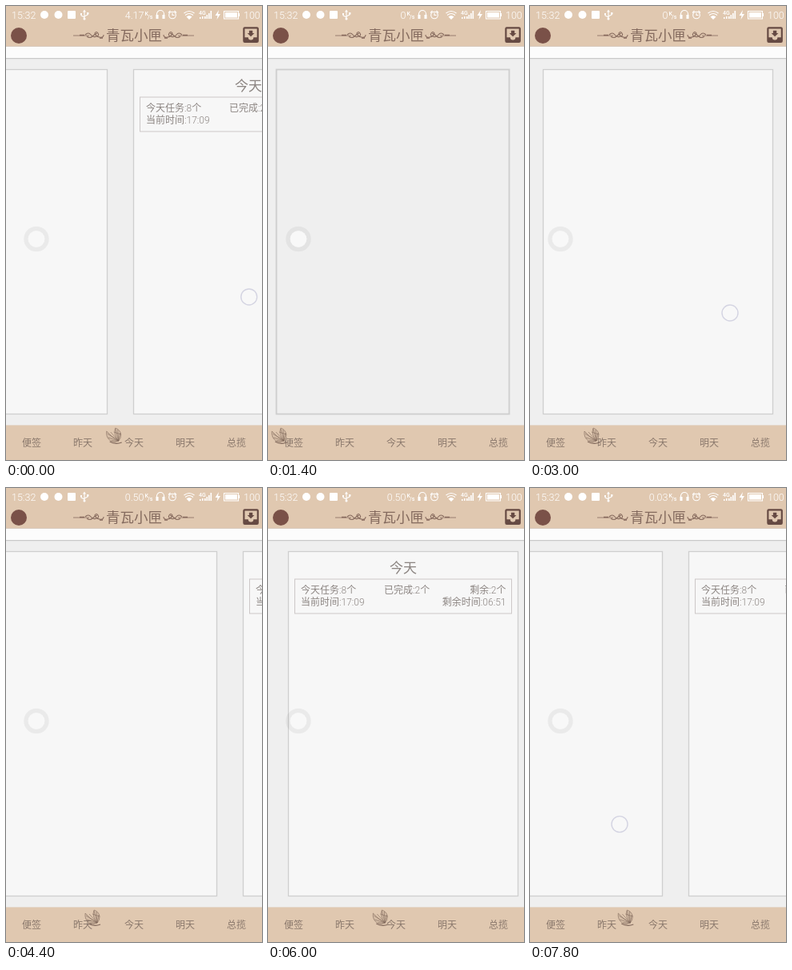
An HTML page for the animation above (8000 ms loop, 320 px wide and 568 px high).

```html
<!DOCTYPE html>
<html lang="zh-CN">
<head>
<meta charset="utf-8">
<style>
  html, body { margin: 0; width: 100%; height: 100%; overflow: hidden; background: #efefef; }
  svg { display: block; width: 100vw; height: 100vh; }
  text { font-family: Roboto, "Noto Sans CJK SC", "Noto Sans CJK JP", "Noto Sans CJK", sans-serif; font-weight: 300; fill: #8c8582; }
  .mid { text-anchor: middle; }
  .end { text-anchor: end; }
  .info { font-size: 12px; }
  .status text { fill: #fff; font-size: 12.5px; }
  .status .unit { font-size: 7px; font-weight: 500; }
  .line { fill: none; stroke: #fff; stroke-width: 1.1; }
  .panel { fill: #f7f7f7; stroke: #cfcfcf; stroke-width: 1.3; }
  #tabs text { fill: #8a786c; }
</style>
</head>
<body>
<svg viewBox="0 0 320 568" preserveAspectRatio="none">
  <defs>
    <g id="ornament" fill="none" stroke="#866a5d">
      <path d="M84 37H104" stroke-width=".8"/>
      <path d="M99 36q4-4 7 0t7 2q4-1 2-4t-4 0q1 4 6 5t5-3M101 38q4 3 7 0t6-4" stroke-width="1.1"/>
      <path d="M92 36.5h6M117 40h4" stroke-width="1.5"/>
    </g>
  </defs>

  <rect width="320" height="568" fill="#efefef"/>
  <g id="pages">
    <rect x="14.5" y="79.5" width="291" height="431" fill="#efefef" stroke="#cecece" stroke-width="1.8"/>
    <rect class="panel" x="336.5" y="79.5" width="287" height="431"/>
    <g transform="translate(656)">
      <rect class="panel" x=".5" y="79.5" width="287" height="431"/>
      <text class="mid" x="144" y="106" font-size="17">今天</text>
      <rect x="8.5" y="114" width="271" height="43" fill="#f7f7f7" stroke="#cdc8c8"/>
      <g class="info">
        <text x="16" y="132">今天任务:8个</text>
        <text x="120" y="132">已完成:2个</text>
        <text class="end" x="272.5" y="132">剩余:2个</text>
        <text x="16" y="146.5">当前时间:17:09</text>
        <text class="end" x="272.5" y="146.5">剩余时间:06:51</text>
      </g>
    </g>
  </g>

  <circle cx="38" cy="291.5" r="13" fill="none" stroke="#000" stroke-opacity=".05" stroke-width="5.5"/>
  <circle cx="38" cy="291.5" r="10.3" fill="#f8f8f8"/>
  <circle id="finger" r="10" fill="#fafafa" fill-opacity=".5" stroke="#d4d4e2" stroke-width="1.4"/>

  <rect y="51" width="320" height="14" fill="#fcfcfc"/>
  <path d="M0 65.7H320" stroke="#c9c9c9" stroke-width="1.3"/>
  <rect width="320" height="50" fill="#e0c8b0"/>
  <path d="M0 50.5H320" stroke="#d8cabd"/>
  <rect y="525" width="320" height="43" fill="#e0c8b0"/>
  <path d="M0 524.5H320" stroke="#e4d8cc"/>

  <circle cx="16" cy="37" r="10" fill="#7a5148"/>
  <use href="#ornament"/>
  <use href="#ornament" transform="translate(319) scale(-1 1)"/>
  <text class="mid" x="160" y="42.5" font-size="17.5" style="fill:#846a5e">青瓦小匣</text>
  <g transform="translate(293 23) scale(1.09)" fill="#664a43">
    <rect x="3" y="3" width="18" height="18" rx="2"/>
    <path d="M5 5H19V15H15A3 3 0 0 1 9 15H5Z" fill="#e0c8b0"/>
    <path d="M10 7H14V10H16L12 14L8 10H10Z"/>
  </g>

  <g class="status">
    <text x="7" y="15.5">15:32</text>
    <g fill="#fff">
      <circle cx="48" cy="11" r="5"/>
      <circle cx="65.5" cy="11" r="5"/>
      <rect x="77" y="6" width="10" height="10" rx="1"/>
      <circle cx="98" cy="16" r="1.5"/>
      <path d="M96 7.5L98 4.5L100 7.5ZM101 8h2.4v2.4H101ZM93 9h2v2h-2Z"/>
      <path d="M187.5 11h3v5h-3ZM195.5 11h3v5h-3ZM266 5L261.5 12H264.5L263.5 17L268 10H265Z"/>
      <path d="M225.5 13.5q3.5-3 7 0L229 17Z"/>
      <path d="M242 14h1.5v2H242ZM245 13h1.5v3H245ZM248 13h1.6v3H248ZM250.5 11h1.6v5h-1.6ZM253 9h1.6v7H253ZM255.5 6h1.6v10h-1.6Z"/>
      <rect x="274" y="8" width="15" height="6.5"/>
    </g>
    <path class="line" d="M98 16V7M98 14l-4-2v-2M98 13l4-2v-1"/>
    <path class="line" d="M188.5 13v-3a4.5 4.5 0 0 1 9 0v3"/>
    <path class="line" d="M208 8.5v3h2.5M203 8.5l2.5-2.5M213 8.5L210.5 6"/>
    <circle class="line" cx="208" cy="11.5" r="4.3"/>
    <path class="line" d="M222.5 9q6.500-5 13 0M224 11.5q5-4 10 0"/>
    <path class="line" d="M272.5 6.5h18v9.5h-18ZM291.5 9v4"/>
    <text class="unit" x="241" y="11">4G</text>
    <text x="297" y="15.5">100</text>
    <text id="speed" class="end" x="172.5" y="15.5"></text>
    <text class="unit" x="173.5" y="11.5">K</text>
    <text class="unit" x="177" y="15.5">/s</text>
  </g>

  <g class="info" id="tabs"></g>
  <g id="butterfly" fill="#80685b" fill-opacity=".1" stroke="#80685b" stroke-width=".6">
    <path d="M15 17Q8 9 11 1Q17 3 18 9Q18 14 15 17Z"/>
    <path d="M15 17Q6 12 0 5Q-1 13 5 17Q10 20 15 17Z"/>
    <path fill="none" d="M15 17L11 2M15 17L14 3M15 17L17 7M15 17L1 8M15 17L2 13M15 17L6 17M15 17L5 6M9 6L18 9"/>
    <path fill="none" stroke-width="1.2" d="M4 18Q11 22 19 19"/>
  </g>
</svg>
<script>
  const LOOP = 8000, STEP = 200, PAGE = 320, TAB = 64, FIRST_PAGE = 2;
  const byId = id => document.getElementById(id);

  byId('tabs').innerHTML = ['便签', '昨天', '今天', '明天', '总揽']
    .map((name, i) => `<text class="mid" x="${32 + TAB * i}" y="550.5">${name}</text>`).join('');

  // turn: pages moved; lag: how far the butterfly trails the page; y: where the finger lands
  const swipes = [
    { start: -464, duration: 1000, turn: -1, lag: 270 },
    { start: 600, duration: 860, turn: -1 },
    { start: 1700, duration: 1200, turn: 1 },
    { start: 3000, duration: 400, turn: 1 },
    { start: 3620, duration: 1000, turn: -1, lag: 270 },
    { start: 4634, duration: 1520, turn: 1, lag: -64 },
    { start: 6200, duration: 915, turn: -1, lag: 400 },
    { start: 7346, duration: 1000, turn: 1, lag: -155, y: 440 },
  ];

  function progress({ start, duration }, t) {
    const u = Math.min(1, Math.max(0, (t - start) / duration));
    return u * u * (3 - 2 * u);
  }

  const pageAt = (t, lagOf) =>
    swipes.reduce((page, swipe) => page + swipe.turn * progress(swipe, t - lagOf(swipe)), FIRST_PAGE);

  function speedAt(t) {
    if (t < 1400) return '4.17';
    if (t < 3800) return '0';
    return t < 7400 ? '0.50' : '0.03';
  }

  // The finger drags the page one to one and lets go halfway.
  function drawFinger(t) {
    const finger = byId('finger');
    const swipe = swipes.find(s => t >= s.start && progress(s, t) < 0.5);
    finger.style.visibility = swipe ? 'visible' : 'hidden';
    if (!swipe) return;
    const { turn, y = 384 } = swipe;
    const p = progress(swipe, t);
    finger.setAttribute('cx', (turn > 0 ? 250 : 161) - turn * p * PAGE);
    finger.setAttribute('cy', y - 45 * p);
  }

  function draw(now) {
    const t = Math.floor(now % LOOP / STEP) * STEP;
    const scroll = Math.round(PAGE * pageAt(t, () => 0));
    const flight = 4 + TAB * pageAt(t, ({ lag = 0 }) => lag);
    byId('pages').setAttribute('transform', `translate(${-scroll})`);
    byId('butterfly').setAttribute('transform', `translate(${flight} 527)`);
    byId('speed').textContent = speedAt(t);
    drawFinger(t);
  }

  const begin = performance.now();
  function tick() {
    draw(performance.now() - begin);
    requestAnimationFrame(tick);
  }
  tick();
</script>
</body>
</html>
```
